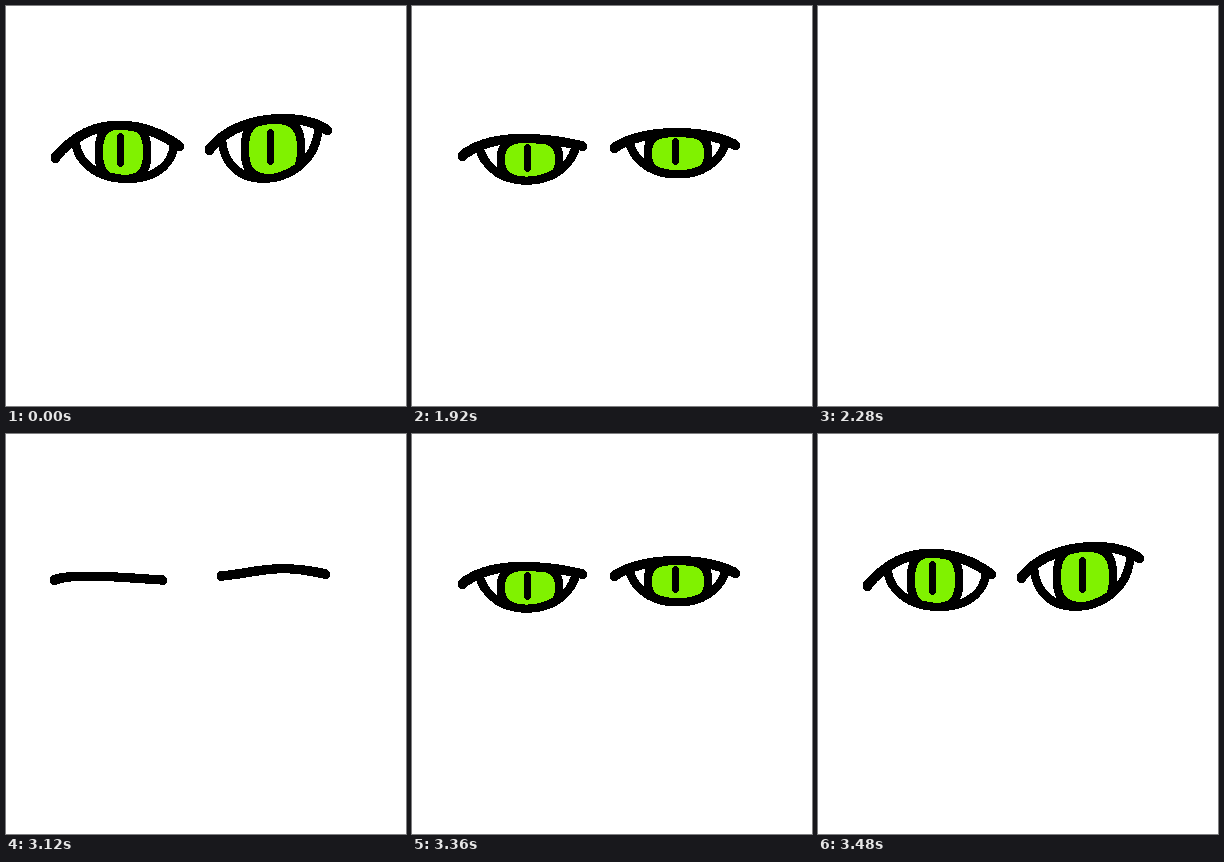
Recreate the animation shown at these times as an HTML page with a canvas. Size 400 by 400 pixels, loop 5400 ms.

```html
<!DOCTYPE html>
<html lang="en">
<head>
<meta charset="utf-8">
<title>Blinking eyes</title>
<style>
  html, body { margin: 0; width: 100%; height: 100%; overflow: hidden; background: #fff; }
  canvas { display: block; width: 100vmin; height: 100vmin; image-rendering: pixelated; }
</style>
</head>
<body>
<canvas id="stage" width="400" height="400"></canvas>
<script>
const ctx = document.getElementById('stage').getContext('2d');
const GREEN = '#80f200';
const ROUNDNESS = 2.8;

// Where the lower lid meets the upper one, along the upper curve.
const corners = [[0.18, 0.955], [0.145, 0.91]];

// lid: Bezier points; depth: drop of the lower lid; cx, rx: iris centre and radius.
const open = {
  pinch: 0,
  eyes: [
    { lid: [[49, 152], [85, 108], [135, 113], [173, 140]], depth: 51, cx: 117, rx: 24 },
    { lid: [[203, 144], [228, 110], [292, 104], [321, 124]], depth: 63, cx: 267, rx: 28 }
  ]
};
const half = {
  pinch: 0.1,
  eyes: [
    { lid: [[50, 150], [78, 127], [128, 130], [170, 140]], depth: 47, cx: 118, rx: 29 },
    { lid: [[202, 142], [232, 122], [292, 122], [323, 139]], depth: 45, cx: 266, rx: 30 }
  ]
};
const closed = {
  eyes: [
    { lid: [[48, 146], [68, 139], [110, 143], [156, 146]] },
    { lid: [[215, 142], [255, 138], [270, 129], [319, 140]] }
  ]
};
const blank = { eyes: [] };

const mix = (a, b, t) => a.map((v, k) => v + (b[k] - v) * t);

// Halfway between the half-open and the closed eye.
const slit = {
  pinch: half.pinch,
  eyes: half.eyes.map((eye, i) => ({
    ...eye,
    lid: eye.lid.map((p, k) => mix(p, closed.eyes[i].lid[k], 0.5)),
    depth: eye.depth / 2
  }))
};

const FRAME = 120;
const timeline = [
  [open, 16], [half, 1], [slit, 1], [closed, 1], [blank, 7],
  [closed, 1], [slit, 1], [half, 1], [open, 16]
];
const loop = FRAME * timeline.reduce((sum, step) => sum + step[1], 0);

// De Casteljau: repeated mixing of neighbours.
function bezier(pts, t) {
  while (pts.length > 1) pts = pts.slice(1).map((p, i) => mix(pts[i], p, t));
  return pts[0];
}

function sample(at, from = 0, to = 1, steps = 240) {
  return Array.from({ length: steps + 1 }, (_, i) => at(from + (to - from) * i / steps));
}

function superellipse(cx, cy, rx, ry) {
  const bend = v => Math.sign(v) * Math.abs(v) ** (2 / ROUNDNESS);
  return sample(t => {
    const a = t * 2 * Math.PI;
    return [cx + rx * bend(Math.cos(a)), cy + ry * bend(Math.sin(a))];
  });
}

// Hard-edged round brush, stamped along the points.
function brush(points, size) {
  const r = size / 2;
  ctx.fillStyle = '#000';
  for (const [x, y] of points) {
    const x0 = Math.round(x - r), y0 = Math.round(y - r);
    for (let row = 0; row < size; row++) {
      const dy = row + 0.5 - r;
      const inset = Math.round(r - Math.sqrt(r * r - dy * dy));
      ctx.fillRect(x0 + inset, y0 + row, size - 2 * inset, 1);
    }
  }
}

function trace(points) {
  ctx.beginPath();
  for (const [x, y] of points) ctx.lineTo(x, y);
  ctx.closePath();
}

function drawEye(eye, [from, to], pinch) {
  const onLid = t => bezier(eye.lid, t);
  const a = onLid(from), b = onLid(to);
  const inset = (b[0] - a[0]) * pinch;
  const underPts = [a, [a[0] + inset, a[1] + eye.depth], [b[0] - inset, b[1] + eye.depth], b];
  const under = sample(t => bezier(underPts, t));

  // The iris spans the gap between the lids.
  const top = onLid(0.5)[1], bottom = bezier(underPts, 0.5)[1];
  const cy = (top + bottom) / 2, ry = (bottom - top) / 2;
  const iris = superellipse(eye.cx, cy, eye.rx, ry);

  ctx.save();
  trace([...sample(onLid, from, to), ...under.reverse()]);
  ctx.clip();
  trace(iris);
  ctx.fillStyle = GREEN;
  ctx.fill();
  brush(iris, 8);
  ctx.restore();

  brush(under, 8);
  brush(sample(t => [eye.cx - 3, cy - 2 + ry * (t - 0.5)]), 7);
}

function draw(pose) {
  ctx.fillStyle = '#fff';
  ctx.fillRect(0, 0, 400, 400);
  pose.eyes.forEach((eye, i) => {
    if (eye.depth) drawEye(eye, corners[i], pose.pinch);
    brush(sample(t => bezier(eye.lid, t)), 9);
  });
}

function poseAt(time) {
  let rest = time % loop;
  for (const [pose, frames] of timeline) {
    if (rest < frames * FRAME) return pose;
    rest -= frames * FRAME;
  }
  return open;
}

let shown = null;
const start = performance.now();
function tick() {
  const pose = poseAt(performance.now() - start);
  if (pose !== shown) draw(shown = pose);
  requestAnimationFrame(tick);
}
tick();
</script>
</body>
</html>
```
